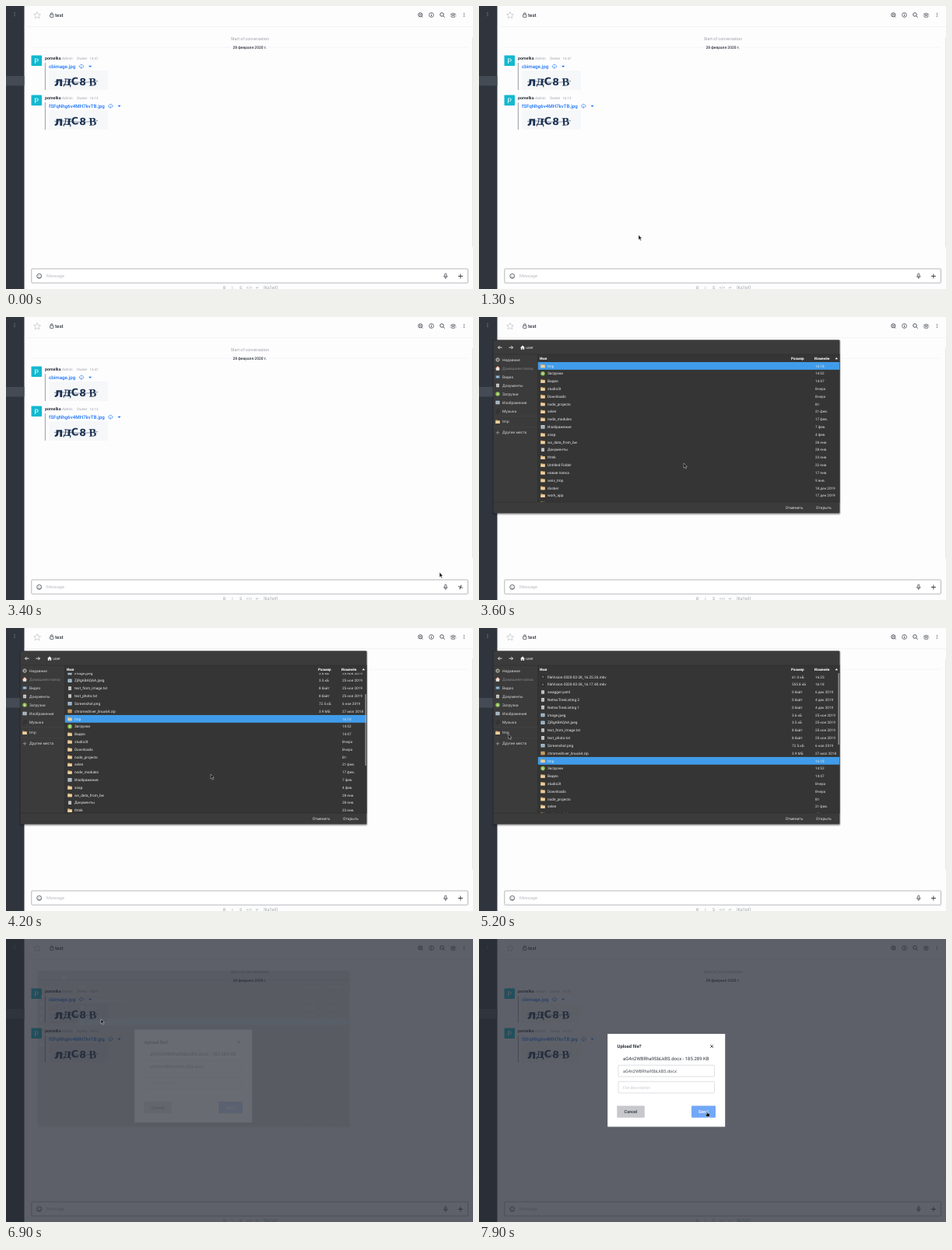
Recreate the animation shown at these times as an HTML page. Size 600 by 364 pixels, loop 8 s.

```html
<!DOCTYPE html>
<html lang="ru">
<head>
<meta charset="utf-8">
<title>File upload</title>
<style>
html, body { margin: 0; width: 100%; height: 100%; overflow: hidden; background: #fdfdfe; }
svg { display: block; width: 600px; height: 364px; font-family: Roboto, "Open Sans", sans-serif; text-rendering: geometricPrecision; }
</style>
</head>
<body>
<svg id="stage" viewBox="0 0 600 364"></svg>
<script>
const LOOP = 8000, STEP = 100, ROW = 9.81, DARK = '#2f343d', BLUE = '#1d74f5';

const rect = (x, y, w, h, fill, more = '') => `<rect x="${x}" y="${y}" width="${w}" height="${h}" fill="${fill}" ${more}/>`;
const text = (x, y, size, fill, str, more = '') => `<text x="${x}" y="${y}" font-size="${size}" fill="${fill}" ${more}>${str}</text>`;
const line = (d, stroke, width = .8, more = '') => `<path d="${d}" fill="none" stroke="${stroke}" stroke-width="${width}" ${more}/>`;
const shape = (d, fill, more = '') => `<path d="${d}" fill="${fill}" ${more}/>`;
const dot = (x, y, r, fill, more = '') => `<circle cx="${x}" cy="${y}" r="${r}" fill="${fill}" ${more}/>`;
const ring = (x, y, r, color, width = .8) => dot(x, y, r, 'none', `stroke="${color}" stroke-width="${width}"`);
const dots = (x, y, color) => [-2, 0, 2].map(d => dot(x, y + d, .55, color)).join('');
const MID = 'text-anchor="middle"', BOLD = 'font-weight="700"', MEDIUM = 'font-weight="500"';

// Chat page
const glyphs = [
  ['л', 67.5, 102.5, 16, 'DejaVu Sans', 0], ['д', 79, 102, 16, 'DejaVu Serif', 4],
  ['С', 88.3, 101.5, 13, 'DejaVu Sans', -4], ['8', 98.5, 102, 12.5, 'DejaVu Sans', 3],
  ['В', 111.3, 102.5, 14.5, 'Liberation Serif', -3]
];
const captcha = rect(55, 83, 76, 25, '#f6f7f9') + glyphs.map(([c, x, y, size, font, turn]) =>
  text(x, y, size, '#1c3353', c, `${MID} ${BOLD} font-family="${font}, serif" transform="rotate(${turn} ${x} ${y - 5})"`)).join('') +
  line('M62 97.5C76 95 92 101 118 96.5', '#1c3353', .5);

const message = (dy, time, file, iconX) => `<g transform="translate(0 ${dy})">` +
  rect(32.5, 63.5, 13.5, 13.5, '#12b9d0', 'rx=".8"') + text(39.2, 73.6, 9, '#fff', 'P', MID) +
  text(50, 69.3, 5.3, DARK, 'pomelka', BOLD) +
  text(72, 69.2, 4.7, '#9ea2a8', 'Admin') + text(91, 69.2, 4.7, '#9ea2a8', 'Owner') + text(107.5, 69.2, 4.4, '#9ea2a8', time) +
  rect(49.8, 73, 1.2, 35, '#a9adb3') + text(55, 79.6, 6.2, BLUE, file, MEDIUM) +
  line(`M${iconX - 1.2} 79h-.5a1.3 1.3 0 0 1 0-2.500a2 2 0 0 1 3.700 0a1.3 1.3 0 0 1 0 2.500h-.5M${iconX} 77.500v2.800m-1-1l1 1l1-1`, BLUE, .65) +
  shape(`M${iconX + 9.3} 76.700h4l-2 2.300z`, BLUE) + captcha + '</g>';

const page =
  rect(0, 0, 600, 364, '#fdfdfe') + rect(0, 0, 23.5, 364, DARK) + rect(0, 90, 23.5, 12.500, '#454b55') + dots(11, 10.5, '#9ea2a8') +
  rect(23.5, 26, 577, .6, '#eeeff1') + rect(599, 40, 1, 270, '#e6e7ea') +
  line('M40 7.500l1.300 2.900l3.100.3l-2.300 2.100l.7 3.100l-2.800-1.700l-2.800 1.700l.7-3.100l-2.300-2.100l3.100-.3z', '#bfc2c7', .7) +
  rect(56.600, 11, 4.300, 3.400, 'none', `rx=".5" stroke="${DARK}" stroke-width=".7"`) + line('M57.500 11V9.900a1.250 1.250 0 0 1 2.500 0V11', DARK, .7) +
  text(63, 13.800, 6.200, DARK, 'test', MEDIUM) +
  ring(532.300, 11.300, 2.600, DARK) + line('M530.900 10.700h2.800M530.900 12h2.800M534.200 13.300l1.300 1.400', DARK, .6) +
  ring(546.500, 11.500, 2.900, DARK, .7) + line('M546.500 11v2.200M546.500 9.600v.7', DARK) +
  ring(560, 11, 2.300, DARK) + line('M561.700 12.700l2 2', DARK) +
  ring(574.500, 10.300, 1.200, DARK, .6) + ring(572.300, 10.600, .8, DARK, .5) + ring(576.700, 10.600, .8, DARK, .5) +
  line('M572.500 14.300v-1a1.200 1.200 0 0 1 1.200-1h1.600a1.200 1.200 0 0 1 1.200 1v1zM571 13.400v-1M578 13.400v-1', DARK, .6) + dots(588.500, 11.500, DARK) +
  text(313.300, 43.800, 5.300, '#9b9fa6', 'Start of conversation', MID) +
  rect(32.500, 52.800, 561, .6, '#eceef0') + rect(290, 49, 47, 8, '#fdfdfe') + text(313.300, 54.800, 4.900, DARK, '28 февраля 2020 г.', `${MID} ${MEDIUM}`) +
  message(0, '14:47', 'cbimage.jpg', 96.800) + message(51, '16:13', 'fSFqNhg6v4MH7kvTB.jpg', 134.200) +
  rect(32.800, 338, 560.700, 18.200, '#fff', 'rx="1" stroke="#a3a6ab" stroke-width=".8"') +
  ring(42.700, 347.400, 3, DARK, .7) + dot(41.600, 346.600, .45, DARK) + dot(43.800, 346.600, .45, DARK) + line('M41 348.200a1.800 1.800 0 0 0 3.400 0', DARK, .6) +
  text(52, 349.200, 5.650, '#b9bcc2', 'Message') +
  rect(563.700, 344, 2.200, 4.300, 'none', `rx="1.100" stroke="${DARK}" stroke-width=".7"`) + line('M562.500 347a2.300 2.300 0 0 0 4.600 0M564.800 349.400v1.600', DARK, .7) +
  line('M580.900 347.500h6M583.900 344.500v6', DARK, .9, 'id="plus"') +
  [['B', 280.500], ['i', 291], ['S', 301.500], ['&lt;/&gt;', 312.500], ['↵', 323], ['[KaTeX]', 340]]
    .map(([s, x]) => text(x, 364, 5.200, '#9b9fa6', s, MID)).join('');

// File chooser: kind|name|size|date
const parse = s => s.trim().split('\n').map(r => r.trim().split('|'));
const home = parse(`
  v|fileVision-2020-02-28_16.25.26.mkv|61.0 кБ|16:25
  v|fileVision-2020-02-28_16.17.40.mkv|555.8 кБ|16:18
  t|swagger.yaml|0 байт|6 дек 2019
  t|NetnwTreeListing 2|0 байт|4 дек 2019
  t|NetnwTreeListing 1|0 байт|4 дек 2019
  i|image.jpeg|3.6 кБ|25 ноя 2019
  i|ZjRgABAQAA.jpeg|3.5 кБ|25 ноя 2019
  t|text_from_image.txt|8 байт|25 ноя 2019
  t|text_photo.txt|8 байт|25 ноя 2019
  i|Screenshot.png|72.5 кБ|6 ноя 2019
  z|chromedriver_linux64.zip|3.9 МБ|27 июл 2018
  d|tmp||16:18
  g|Загрузки||14:52
  d|Видео||14:47
  d|studio3t||Вчера
  d|Downloads||Вчера
  d|node_projects||Вт
  d|selen||21 фев.
  d|node_modules||17 фев.
  p|Изображения||7 фев.
  d|snap||4 фев.
  d|ws_data_from_bw||28 янв.
  t|Документы||28 янв.
  d|thtnk||23 янв.
  d|Untitled Folder||22 янв.
  d|новая папка||17 янв.
  d|venv_tmp||9 янв.
  d|docker||18 дек 2019
  d|work_app||17 дек 2019
  d|||`);
const tmp = parse(`
  i|cbimage.jpg|3.6 кБ|14:47
  i|fSFqNhg6v4MH7kvTB.jpg|3.6 кБ|16:13
  t|text.txt|8 байт|Вчера
  t|list.txt|8 байт|Вчера
  t|aG4n2WBRha9SbLkBS.docx|185.3 кБ|Вчера`);
const tint = { v: '#222', t: '#dcdcd8', i: '#a9c3d6', z: '#d9a45c', p: '#b6c6d2' };
const icon = (kind, x, y) =>
  kind === 'd' ? shape(`M${x - 2.700} ${y - 2.300}h2l.6.6h2.800v4h-5.400z`, '#d3a96c') + rect(x - 2.700, y - .9, 5.400, 3.200, '#ecd0a0', 'rx=".3"') :
  kind === 'g' ? dot(x, y, 2.800, '#86b64a') + line(`M${x} ${y - 1.600}v2.800m-1.200-1.200l1.200 1.200l1.200-1.200`, '#fff', .7) :
  kind === 'v' ? rect(x - 2.300, y - 2.300, 4.600, 4.600, '#222', 'rx=".8"') + ring(x, y, 1.100, '#aaa', .6) :
  rect(x - (kind === 't' ? 1.900 : 2.600), y - 2.300, kind === 't' ? 3.800 : 5.200, 4.600, tint[kind], 'rx=".4"') +
  line(`M${x - 1.200} ${y - .6}h2.400m-2.400 1.500h2.400`, '#6b7780', .5);
const rows = list => list.map(([kind, name, size, date], i) => {
  const y = 62.900 + i * ROW;
  return icon(kind, 82, y) + text(88, y + 1.700, 4.750, '#ececec', name) +
    text(402, y + 1.700, 4.650, '#e0e0e0', size) + text(432, y + 1.700, 4.650, '#e0e0e0', date);
}).join('');

const places = [['Недавние', 55], ['Домашняя папка', 66], ['Видео', 77], ['Документы', 88], ['Загрузки', 99],
  ['Изображения', 110], ['Музыка', 121], ['tmp', 134.700], ['Другие места', 148.700]];
const placeIcons = [
  ring(24, 55, 2.100, '#d8d2c4', 1) + line('M24 53.800V55h-1', '#ddd', .5),
  shape('M21 66.200l3-3l3 3h-.8v2.500h-4.400v-2.500z', '#e8e4de') + line('M21 66.200l3-3l3 3', '#d8603f', .8),
  rect(21.400, 75, 5.200, 4, '#5b7f9c') + rect(22.400, 76, 3.200, 2, '#9cc0d8'),
  icon('t', 24, 88), icon('g', 24, 99), icon('p', 24, 110),
  line('M23.200 123v-4l2.600-.6v3.800', '#2a2a2a', .7) + dot(22.600, 123, .8, '#2a2a2a') + dot(25.200, 122.200, .8, '#2a2a2a'),
  icon('d', 24, 134.700), line('M21.700 148.700h4.600M24 146.400v4.600', '#999', .8)
].join('');

const dialog = `<g id="dialog">` +
  rect(17.500, 29, 447, 225.500, '#000', 'rx="2" opacity=".25"') + rect(18.500, 29.500, 445, 223, '#3b3b3b', 'rx="1.500"') +
  rect(75.500, 48, 388, 190, '#353535') + rect(18.500, 47.800, 445, .5, '#2b2b2b') + rect(75.200, 48, .5, 190, '#2b2b2b') + rect(18.500, 237.800, 445, .5, '#2b2b2b') +
  line('M29.500 39.200h-5m2-2l-2 2l2 2M38.500 39.200h5m-2-2l2 2l-2 2', '#f0f0f0', .9) +
  shape('M53 39.500l3-3l3 3h-.9v2.500h-1.500v-1.700h-1.200v1.700h-1.500v-2.500z', '#f0f0f0') + text(60.300, 40.900, 4.900, '#eee', 'user', 'id="crumb"') +
  placeIcons + places.map(([s, y], i) => text(30, y + 1.700, 4.900, '#d6d6d6', s, `id="place${i}"`)).join('') +
  rect(18.500, 127.500, 57, .4, '#484848') + rect(18.500, 141.500, 57, .4, '#484848') +
  text(78, 54.800, 4.700, '#fff', 'Имя', BOLD) + text(401, 54.800, 4.700, '#fff', 'Размер', BOLD) + text(430.800, 54.800, 4.700, '#fff', 'Изменён', BOLD) +
  shape('M457.500 54.200l1.800-2.300l1.800 2.300z', '#fff') +
  `<clipPath id="view"><rect x="75.500" y="57.800" width="388" height="180"/></clipPath><g clip-path="url(#view)"><g id="list">` +
  rect(75.500, 58, 388, ROW, '#409cea', 'id="picked"') +
  `<g id="home">${rows(home)}</g><g id="tmp">${rows(tmp)}</g></g></g>` +
  rect(461.500, 58, 1.200, 92, '#a5a5a5', 'id="bar" rx=".6"') +
  text(405, 246.900, 4.900, '#e4e4e4', 'Отменить', MID) + text(443, 246.900, 4.900, '#e4e4e4', 'Открыть', MID) + '</g>';

// Upload window
const file = 'aG4n2WBRha9SbLkBS.docx';
const field = y => rect(179, y, 123.500, 14.700, '#fff', 'rx=".8" stroke="#d0d3d8" stroke-width=".7"');
const modal = `<g id="modal">` + rect(165.200, 122, 151, 119.500, '#fff') +
  text(177.500, 140.200, 5.900, DARK, 'Upload file?', BOLD) + line('M297.300 136.300l3.600 3.600m0-3.600l-3.600 3.600', DARK, .9) +
  text(185, 155.500, 6, DARK, file + ' - 185.289 KB') +
  field(162.300) + text(185, 171.600, 5.500, '#4d525b', file) + field(183.300) + text(185, 192.500, 5.200, '#c5c8cd', 'File description') +
  rect(177.300, 214.500, 35.500, 15.200, '#c6c8cc', 'rx=".8"') + text(195, 224, 5.500, DARK, 'Cancel', `${MID} ${MEDIUM}`) +
  rect(273, 214.500, 31, 15.200, '#72a8f8', 'rx=".8"') + text(288.300, 224, 5.500, '#fff', 'Send', `${MID} ${MEDIUM}`) + '</g>';

const cursor = `<g id="cursor">` +
  shape('M0 0v6.200l1.400-1.300l1.100 2.300l1-.5l-1.100-2.200h1.900z', '#111', 'id="arrow" stroke="#fff" stroke-width=".4"') +
  shape('M-.6 0q.6-.8 1.200 0v2.300l2.300.7q.8.3.6 1.300l-.6 2.500h-3.200l-2-2.600q.2-.9 1.700.1z', '#111', 'id="hand" stroke="#fff" stroke-width=".4"') + '</g>';

document.getElementById('stage').innerHTML = page + dialog + rect(0, 0, 600, 364, '#282d36', 'id="shade"') + modal + cursor;

const $ = id => document.getElementById(id);
const set = (id, name, value) => $(id).setAttribute(name, value);
const show = (id, on) => set(id, 'visibility', on ? 'visible' : 'hidden');
const ramp = (t, a, b) => Math.min(1, Math.max(0, (t - a) / (b - a)));
const ease = p => p * p * (3 - 2 * p);

// Pointer stops: time, x, y
const stops = [[500, 500, 4], [900, 330, 145], [1300, 205, 294.500], [1400, 205, 294.500], [1800, 522, 322], [2200, 583, 345],
  [2700, 583, 345], [3200, 557, 328.500], [3400, 557, 328.500], [3600, 263, 188], [4500, 263, 188], [5100, 37.800, 136.500],
  [5500, 37.800, 136.500], [6000, 122, 103], [7200, 122, 103], [7700, 293, 221.800]];
function pointer(t) {
  const i = stops.findIndex(s => s[0] > t);
  if (i < 0) return stops.at(-1).slice(1);
  const [a, b] = [stops[Math.max(0, i - 1)], stops[i]], p = ease(ramp(t, a[0], b[0]));
  return [a[1] + (b[1] - a[1]) * p, a[2] + (b[2] - a[2]) * p];
}

function draw(t) {
  const [x, y] = pointer(t), inTmp = t >= 5400;
  show('cursor', t >= 500);
  set('cursor', 'transform', `translate(${x} ${y})`);
  show('arrow', t >= 500 && t < 7700);
  show('hand', t >= 7700);
  set('plus', 'transform', `rotate(${45 * ramp(t, 2400, 2600) * (1 - ramp(t, 3300, 3500))} 583.9 347.5)`);

  const out = ramp(t, 6700, 7000), scale = 1 - .15 * out;
  $('dialog').style.display = t >= 3600 && out < 1 ? '' : 'none';
  set('dialog', 'opacity', (1 - out) ** 2);
  set('dialog', 'transform', `translate(241 141) scale(${scale}) translate(-241 -141)`);
  const scroll = inTmp ? 0 : 11 * ROW * (1 - ease(ramp(t, 3900, 4500)));
  set('list', 'transform', `translate(0 ${-scroll})`);
  $('home').style.display = inTmp ? 'none' : '';
  $('tmp').style.display = inTmp ? '' : 'none';
  $('picked').style.display = inTmp && t < 6200 ? 'none' : '';
  set('picked', 'y', 58 + (inTmp ? 4 : 11) * ROW);
  $('bar').style.display = t >= 3900 && !inTmp ? '' : 'none';
  set('bar', 'y', 58 + scroll * .5);
  $('crumb').textContent = inTmp ? 'tmp' : 'user';
  set('place1', 'fill', inTmp ? '#d6d6d6' : '#858585');
  set('place7', 'fill', inTmp ? '#858585' : '#d6d6d6');

  set('shade', 'opacity', .75 * ramp(t, 6600, 6900));
  const open = ramp(t, 6850, 7150);
  set('modal', 'opacity', open ** 1.3);
  set('modal', 'transform', `translate(0 ${-6.500 * (1 - open)})`);
}

const start = performance.now();
function tick() {
  const t = (performance.now() - start) % LOOP;
  draw(Math.floor(t / STEP) * STEP);
  requestAnimationFrame(tick);
}
tick();
</script>
</body>
</html>
```
